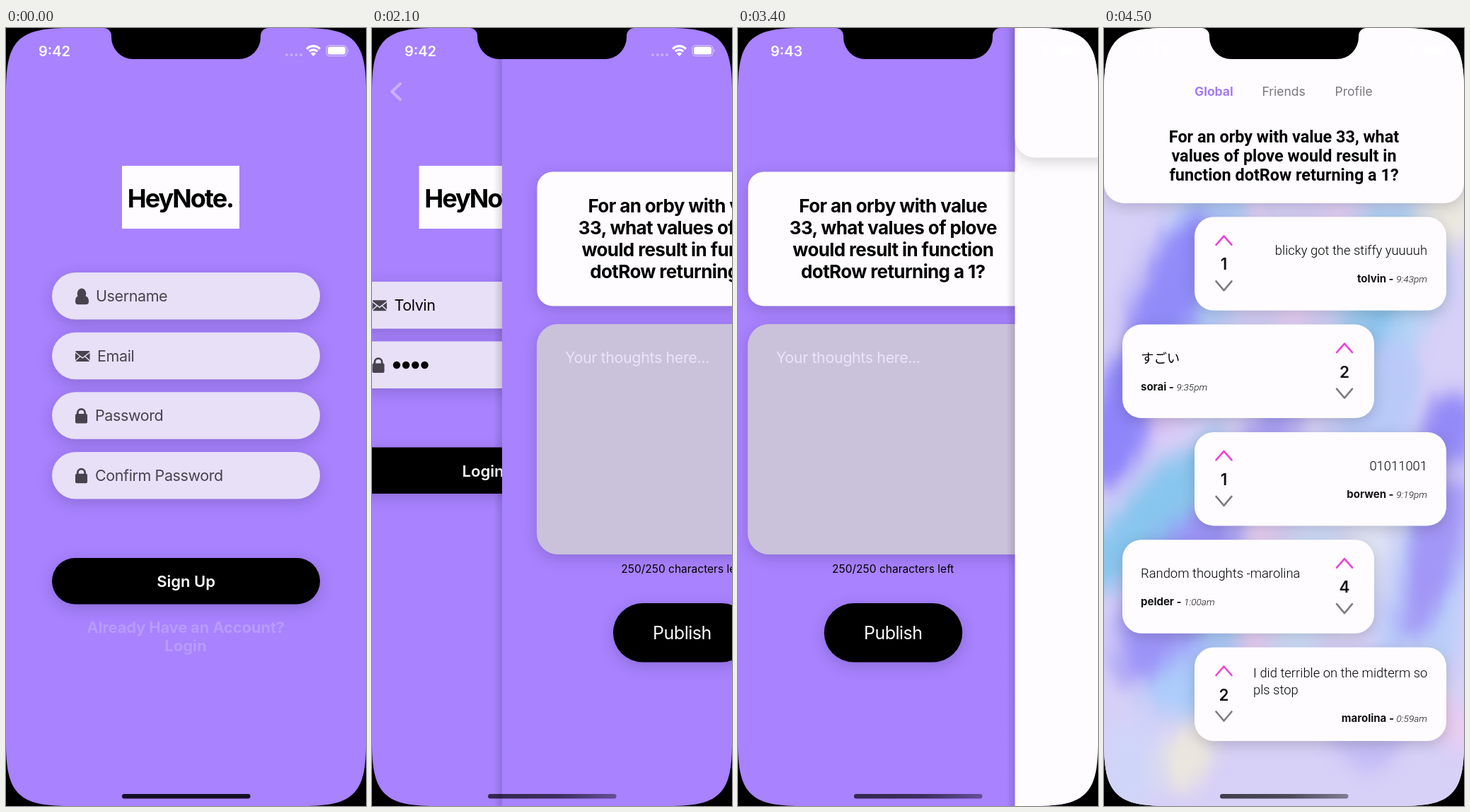
Animation of 509x1101 px, one loop 4.6 s. Source, as an HTML page:

```html
<!DOCTYPE html>
<html lang="en">
<head>
<meta charset="utf-8">
<title>Sign up, ask and read</title>
<style>
  html, body { margin: 0; width: 100%; height: 100%; overflow: hidden; background: #000; }
  svg { display: block; width: 100%; height: 100%; }
  text { font-family: Inter, sans-serif; white-space: pre; }
  .mid { text-anchor: middle; }
  .end { text-anchor: end; }
  .roboto { font-family: Roboto, "Noto Sans CJK JP", "Noto Sans CJK", sans-serif; }
  .light { font-weight: 300; }
  .semi { font-weight: 600; }
  .bold { font-weight: 700; }
  .body { letter-spacing: -.4px; }
  .tight { letter-spacing: -.62px; }
  .time { font-family: Roboto, sans-serif; font-size: 13.6px; font-weight: 300; font-style: italic; }
  .line { fill: none; stroke-linecap: round; stroke-linejoin: round; }
  .shadow { filter: drop-shadow(0 5px 10px rgba(0, 0, 0, .17)); }
</style>
</head>
<body>
<svg id="stage" viewBox="0 0 509 1101" preserveAspectRatio="none"></svg>
<script>
const W = 509, H = 1101, LOOP = 4600, STEP = 100;
const PURPLE = '#a882ff', PAPER = '#fefcff', FIELD = '#e7e0f7', INK = '#47434d';
const USER = 'Tolvin';
const PUSHES = [-1000, 30, 1990, 3354];
const TYPING = { user: 700, password: 1400 };
const LOADED = { question: 3500, answers: 4000 };

const rect = (x, y, w, h, r, fill, extra = '') =>
  `<rect x="${x}" y="${y}" width="${w}" height="${h}" rx="${r}" fill="${fill}" ${extra}/>`;
const text = (x, y, size, str, cls = '', fill = '#000', extra = '') =>
  `<text x="${x}" y="${y}" font-size="${size}" class="${cls}" fill="${fill}" ${extra}>${str}</text>`;
const lines = (x, y, gap, size, list, cls) =>
  list.map((s, i) => text(x, y + i * gap, size, s, cls)).join('');
const stroke = (d, color, width) =>
  `<path class="line" d="${d}" stroke="${color}" stroke-width="${width}"/>`;
const group = (id, inner) => `<g id="${id}">${inner}</g>`;

// Icons are drawn around the vertical centre of their field.
const icons = {
  user: `<ellipse cx="107" cy="-3.5" rx="6.3" ry="7.3" fill="${INK}"/>
    <path d="M98 8 Q98 0 103 0 Q107 4 111 0 Q117 0 117 8 Q117 12 113 12 H102 Q98 12 98 8Z" fill="${INK}"/>`,
  mail: rect(98, -7, 20.5, 15, 1.5, INK) +
    stroke('M98 -5 L108.2 3 L118.5 -5 M98 7 L104.5 1 M118.5 7 L112 1', FIELD, 1.5),
  lock: rect(98, -2.5, 17, 13.5, 2, INK) +
    stroke('M101.3 -1 V-4 A5.2 5.2 0 0 1 111.7 -4 V-1', INK, 2.8)
};

const field = (y, icon, x, label, id) => `
  ${rect(65, y, 379, 66.5, 33.2, FIELD, 'class="shadow"')}
  <g transform="translate(0 ${y + 33.3})">${icons[icon]}</g>
  ${text(x, y + 41, 21.5, label, 'body', INK, id ? `id="${id}"` : '')}`;

const button = (y, label) =>
  rect(65, y, 379, 65.5, 32.7, '#000', 'class="shadow"') +
  text(254.5, y + 41, 22, label, 'mid semi', '#fff');

const brand = rect(164, 195, 166, 89, 0, PAPER) +
  text(246.5, 254, 36, 'HeyNote.', 'mid bold', '#000', 'letter-spacing="-2"');

const signUp = brand +
  field(346, 'user', 127, 'Username') +
  field(430.7, 'mail', 129, 'Email') +
  field(515.3, 'lock', 126, 'Password') +
  field(600, 'lock', 126, 'Confirm Password') +
  button(750, 'Sign Up') +
  group('loginLink', text(254, 855.5, 22, 'Already Have an Account?', 'mid bold', '#fff', 'letter-spacing="-.2"') +
    text(254, 882, 22, 'Login', 'mid bold', '#fff'));

const bullets = [0, 1, 2, 3].map(i =>
  `<circle class="bullet" cx="${132.4 + 13.2 * i}" cy="477" r="5.2"/>`).join('');

const login = brand +
  field(359, 'mail', 129, 'Username', 'userText') +
  field(443.6, 'lock', 126, 'Password', 'passText') +
  bullets +
  rect(0, 0, 2.6, 26, 1.3, '#4c6fdc', 'id="caret"') +
  button(593.6, 'Login');

const ask = rect(49.5, 203.5, 411, 190, 22, PAPER, 'class="shadow"') +
  lines(254.5, 261, 31, 26, ['For an orby with value', '33, what values of plove',
    'would result in function', 'dotRow returning a 1?'], 'mid bold tight') +
  rect(49, 419, 411, 326, 30, '#cac2da', 'class="shadow"') +
  text(89, 473.5, 21.5, 'Your thoughts here...', 'body', '#ebe3f8') +
  text(254.5, 771, 15.5, '250/250 characters left', 'mid') +
  rect(157, 814, 195.5, 83.5, 41.7, '#000', 'class="shadow"') +
  text(254.5, 865, 25, 'Publish', 'mid', '#fff', 'letter-spacing="-.5"');

// Soft marbled backdrop: cx, cy, rx, ry, turn, colour
const swirls = [
  [135, 340, 65, 130, 12, '#b3cdfa'], [90, 375, 45, 125, 24, '#918bf9'],
  [20, 550, 45, 110, 16, '#8d85f9'], [90, 540, 18, 60, 28, '#dcc4f5'],
  [210, 310, 10, 80, 6, '#ebd0f5'], [170, 490, 40, 80, 30, '#cdd0f8'],
  [405, 360, 72, 125, 12, '#b2d3f6'], [392, 365, 32, 95, 16, '#8fc6ef'],
  [490, 265, 45, 45, 0, '#ebe8e2'], [290, 350, 15, 120, 22, '#edd0f4'],
  [385, 545, 55, 110, 10, '#b9c9f8'], [232, 580, 32, 130, 26, '#aba2f6'],
  [65, 690, 42, 150, 42, '#88c5ee'], [125, 850, 72, 135, 16, '#acccfa'],
  [100, 800, 60, 145, 30, '#9d94f8'], [215, 800, 18, 170, 6, '#edcef2'],
  [285, 800, 40, 130, 12, '#cfddf9'], [370, 730, 28, 130, 14, '#dfe4f5'],
  [455, 800, 60, 140, 10, '#b9cff9'], [465, 750, 36, 120, 16, '#a296f6'],
  [490, 570, 36, 55, 20, '#9389f7'], [455, 930, 30, 60, -35, '#d5e2f6'],
  [485, 975, 22, 60, -35, '#ebccf1'], [380, 985, 50, 70, 20, '#c4bcf6'],
  [40, 1040, 45, 60, 0, '#cfd5f8'], [120, 1030, 36, 50, 20, '#ebe6dd']
];
const backdrop = rect(0, 200, W, H, 0, '#d7d0f7') + '<g filter="url(#soft)">' +
  swirls.map(([x, y, rx, ry, turn, color]) =>
    `<ellipse rx="${rx}" ry="${ry}" fill="${color}" transform="translate(${x} ${y}) rotate(${turn})"/>`).join('') + '</g>';

const answers = [
  ['blicky got the stiffy yuuuuh', 'tolvin', '9:43pm', 1],
  ['すごい', 'sorai', '9:35pm', 2],
  ['01011001', 'borwen', '9:19pm', 1],
  ['Random thoughts -marolina', 'pelder', '1:00am', 4],
  ['I did terrible on the midterm so|pls stop', 'marolina', '0:59am', 2]
];
const answerCard = ([message, author, time, votes], i) => {
  const right = i % 2 === 0, parts = message.split('|'), long = parts.length > 1;
  const vote = right ? 41.5 : 314, edge = right ? 329 : 26, cls = right ? 'end' : '';
  return `<g transform="translate(${right ? 128 : 26} ${267.3 + 152.3 * i})">
    ${rect(0, 0, 356, 132.5, 27, PAPER, 'class="shadow"')}
    <g transform="translate(${vote} 0)">
      ${stroke('M-11 39.5 L0 27 L11 39.5', '#ef41d3', 2.6)}
      ${text(0, 75, 22.5, votes, 'mid semi', '#111')}
      ${stroke('M-11 91 L0 104 L11 91', '#7d7b80', 2.6)}
    </g>
    ${lines(long ? 83 : edge, long ? 42 : 54, 24, 18.4, parts, 'roboto light ' + (long ? '' : cls))}
    ${text(edge, long ? 105 : 93, 15, `${author} - <tspan class="time">${time}</tspan>`, 'bold ' + cls, '#111')}
  </g>`;
};

const feed = group('backdrop', backdrop) +
  group('answers', answers.map(answerCard).join('')) +
  rect(0, -60, W, 308, 28, PAPER, 'id="header" class="shadow"') +
  text(128, 95.5, 17.5, 'Global', 'bold', '#a47cf0') +
  text(223.5, 95.5, 17.5, 'Friends', '', '#7a787d') +
  text(326.5, 95.5, 17.5, 'Profile', '', '#7a787d') +
  group('question', lines(254.5, 161.5, 27.4, 23.4, ['For an orby with value 33, what',
    'values of plove would result in', 'function dotRow returning a 1?'], 'mid roboto bold'));

const page = (inner, fill) => `<g class="page">
  ${rect(-12, 0, 12, H, 0, 'url(#edge)')}${rect(0, 0, W, H, 0, fill)}${inner}</g>`;

const wifiArc = r => {
  const d = r * Math.SQRT1_2;
  return `<path d="M${434.5 - d} ${39 - d} A${r} ${r} 0 0 1 ${434.5 + d} ${39 - d}" fill="none" stroke="#fff" stroke-width="3.2"/>`;
};
const status = text(46, 40, 20, '9:42', 'semi', '#fff', 'id="clock"') +
  [397, 403.7, 410.4, 417].map(x => `<circle cx="${x}" cy="38" r="2" fill="#fff" opacity=".35"/>`).join('') +
  wifiArc(13.3) + wifiArc(8.2) +
  '<path d="M434.5 40 L430.7 36 A5.4 5.4 0 0 1 438.3 36Z" fill="#fff"/>' +
  rect(453, 24.6, 29, 15, 4.6, 'none', 'stroke="#fff" stroke-opacity=".5" stroke-width="1.3"') +
  rect(455, 26.6, 25, 11, 2.8, '#fff') +
  '<path d="M483.6 29.6 Q486 32 483.6 34.6Z" fill="#fff" opacity=".5"/>';

const stage = document.getElementById('stage');
stage.innerHTML = `
  <defs>
    <filter id="soft" filterUnits="userSpaceOnUse" x="-60" y="150" width="630" height="1010"
      color-interpolation-filters="sRGB">
      <feGaussianBlur stdDeviation="14" result="blurred"/>
      <feTurbulence type="fractalNoise" baseFrequency=".014 .007" numOctaves="3" seed="4"/>
      <feDisplacementMap in="blurred" scale="36" xChannelSelector="R" yChannelSelector="G"/>
    </filter>
    <linearGradient id="edge"><stop stop-opacity="0"/><stop offset="1" stop-opacity=".14"/></linearGradient>
    <linearGradient id="bar"><stop stop-opacity=".7"/><stop offset=".55" stop-opacity=".64"/>
      <stop offset="1" stop-opacity=".4"/></linearGradient>
    <clipPath id="screen"><path d="M0 88 C0 18 18 0 88 0 H421 C491 0 509 18 509 88
      V1013 C509 1083 491 1101 421 1101 H88 C18 1101 0 1083 0 1013Z"/></clipPath>
  </defs>
  ${rect(0, 0, W, H, 0, '#000')}
  <g clip-path="url(#screen)">
    ${page(signUp, PURPLE)}${page(login, PURPLE)}${page(ask, PURPLE)}${page(feed, PAPER)}
    ${group('back', stroke('M40 78.8 L28.2 90 L40 101.2', '#fff', 4))}
    ${status}
    ${rect(164, 1084, 181.5, 6.4, 3.2, '#000', 'id="home"')}
  </g>
  <path d="M138 0 A11 11 0 0 1 149 11 V13 A31 31 0 0 0 180 44 H329 A31 31 0 0 0 360 13 V11 A11 11 0 0 1 371 0Z"/>`;

const $ = id => document.getElementById(id);
const pages = [...stage.querySelectorAll('.page')];
const bulletDots = [...stage.querySelectorAll('.bullet')];
const show = (el, on) => el.setAttribute('display', on ? 'inline' : 'none');
const clamp = (v, lo, hi) => Math.min(hi, Math.max(lo, v));

// Critically damped spring from 0 to 1
function pushed(t, start) {
  if (t < start) return 0;
  const u = (t - start) * .01975;
  const p = 1 - Math.exp(-u) * (1 + u);
  return p > .997 ? 1 : p;
}

function drawTyping(t) {
  const typed = clamp(Math.floor((t - TYPING.user) / 100) + 1, 0, USER.length);
  const dots = clamp(Math.floor((t - TYPING.password) / 60) + 1, 0, 4);
  const user = $('userText');
  user.textContent = typed ? USER.slice(0, typed) : 'Username';
  user.setAttribute('fill', typed ? '#000' : INK);
  show($('passText'), !dots);
  bulletDots.forEach((dot, i) => show(dot, i < dots));
  const inPassword = t >= TYPING.password - 100;
  const x = inPassword ? 125 + 13.2 * dots : 129 + (typed ? user.getComputedTextLength() : 0);
  $('caret').setAttribute('x', x);
  $('caret').setAttribute('y', inPassword ? 463 : 379);
  show($('caret'), t >= TYPING.user - 100 && t < 1800);
}

function draw(t) {
  const p = PUSHES.map(start => pushed(t, start)).concat(0);
  pages.forEach((el, i) => {
    show(el, p[i] > 0 && p[i + 1] < 1);
    el.setAttribute('transform', `translate(${W * (1 - p[i]) - .3 * W * p[i + 1]} 0)`);
  });
  $('loginLink').setAttribute('opacity', .2 + .8 * clamp(t / 250, 0, 1));
  $('back').setAttribute('opacity', p[1] * (1 - p[2]));
  drawTyping(t);
  $('clock').textContent = t < 3100 ? '9:42' : '9:43';
  $('home').setAttribute('fill', t < 100 ? '#150f22' : 'url(#bar)');
  const loaded = t >= LOADED.question;
  show($('question'), loaded);
  show($('backdrop'), loaded);
  $('header').setAttribute('height', loaded ? 308 : 243.5);
  show($('answers'), t >= LOADED.answers);
}

const begin = performance.now();
let last = -1;
function tick() {
  const t = Math.floor((performance.now() - begin) % LOOP / STEP) * STEP;
  if (t !== last) draw(last = t);
  requestAnimationFrame(tick);
}
tick();
</script>
</body>
</html>
```
